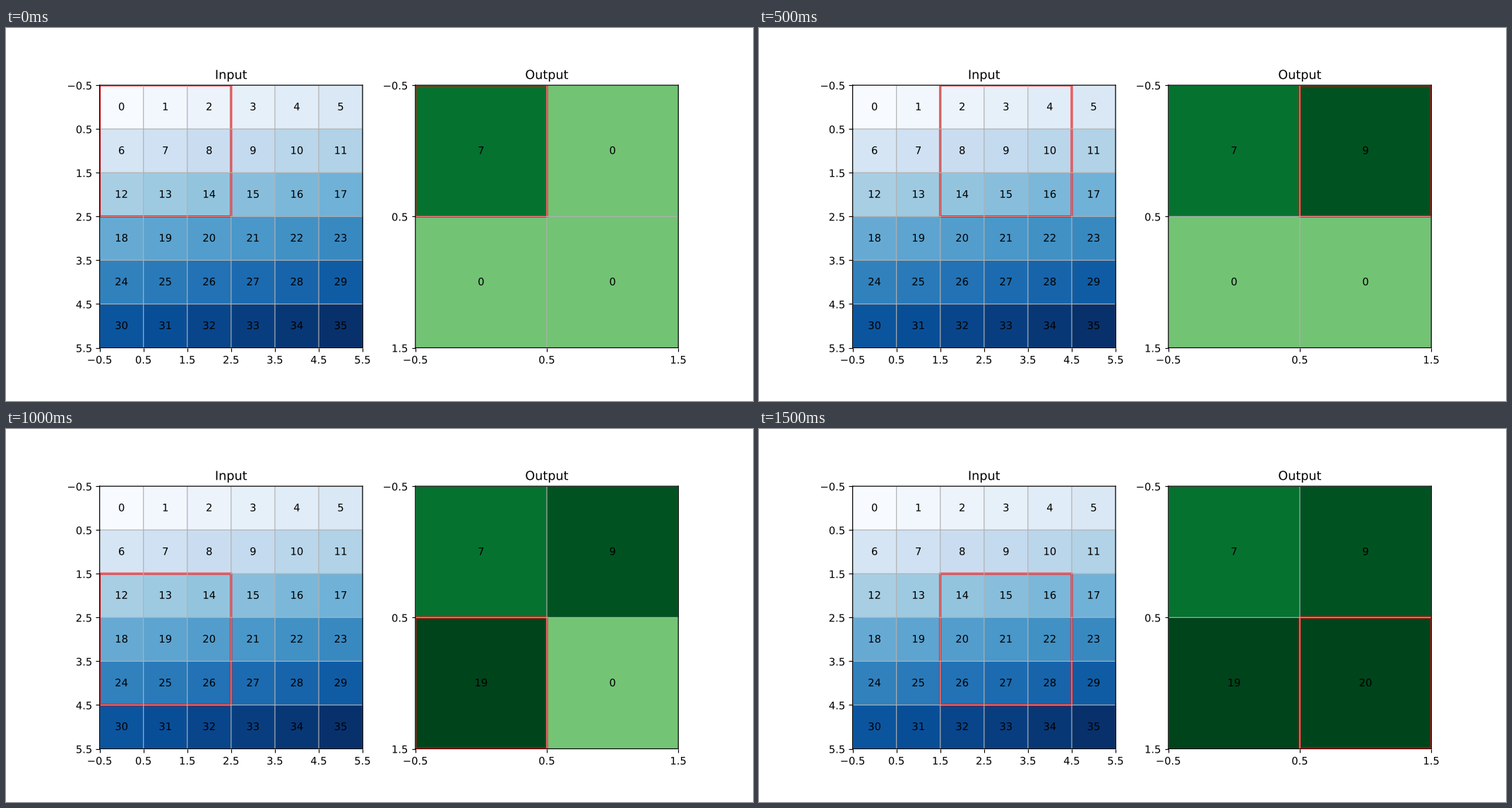
These frames come from a looping animation (1058x529 px, 2 s). A matplotlib script:

```python
import numpy as np
import matplotlib.pyplot as plt
from matplotlib.animation import FuncAnimation
from matplotlib.patches import Rectangle
from matplotlib.patheffects import Normal

# Unsnapped lines and outlined text give soft, sub-pixel placement.
plt.rcParams.update({"font.family": "DejaVu Sans",
                     "path.snap": False,
                     "path.effects": [Normal()]})

SIZE, KERNEL, STRIDE = 6, 3, 2
OUT = (SIZE - KERNEL) // STRIDE + 1
RESULTS = [7, 9, 19, 20]

# Layout units: the figure is 1500 x 750, each panel a square.
WIDTH, HEIGHT = 1500, 750
PANEL, BOTTOM = 528, 107


def draw_matrix(left, matrix, title, cmap, vmin, vmax, window):
    """Show a matrix with cell values, a grid and a red window frame."""
    n = len(matrix)
    ax = fig.add_axes([left / WIDTH, BOTTOM / HEIGHT,
                       PANEL / WIDTH, PANEL / HEIGHT])
    image = ax.imshow(matrix, cmap=cmap, vmin=vmin, vmax=vmax)
    ax.set_title(title)
    edges = np.arange(-0.5, n, 1)
    ax.set_xticks(edges)
    ax.set_yticks(edges)
    ax.grid(True)
    labels = [ax.text(col, row, str(matrix[row, col]), ha="center", va="center")
              for row in range(n) for col in range(n)]
    frame = Rectangle((-0.5, -0.5), window, window,
                      linewidth=2, edgecolor="r", facecolor="none")
    ax.add_patch(frame)
    return image, labels, frame


fig = plt.figure(figsize=(10, 5), dpi=105.8)
values = np.arange(SIZE * SIZE).reshape(SIZE, SIZE)
_, _, in_frame = draw_matrix(188, values, "Input", "Blues", 0, 35, KERNEL)
out_image, out_labels, out_frame = draw_matrix(
    822, np.zeros((OUT, OUT), int), "Output", "Greens", -10, 10, 1)


def update(step):
    row, col = divmod(step, OUT)
    in_frame.set_xy((col * STRIDE - 0.5, row * STRIDE - 0.5))
    out_frame.set_xy((col - 0.5, row - 0.5))

    output = [v if i <= step else 0 for i, v in enumerate(RESULTS)]
    out_image.set_data(np.reshape(output, (OUT, OUT)))
    for label, value in zip(out_labels, output):
        label.set_text(str(value))
    return in_frame, out_frame, out_image, *out_labels


anim = FuncAnimation(fig, update, frames=OUT * OUT, interval=500,
                     repeat=True, repeat_delay=0, blit=False)
plt.show()
```
